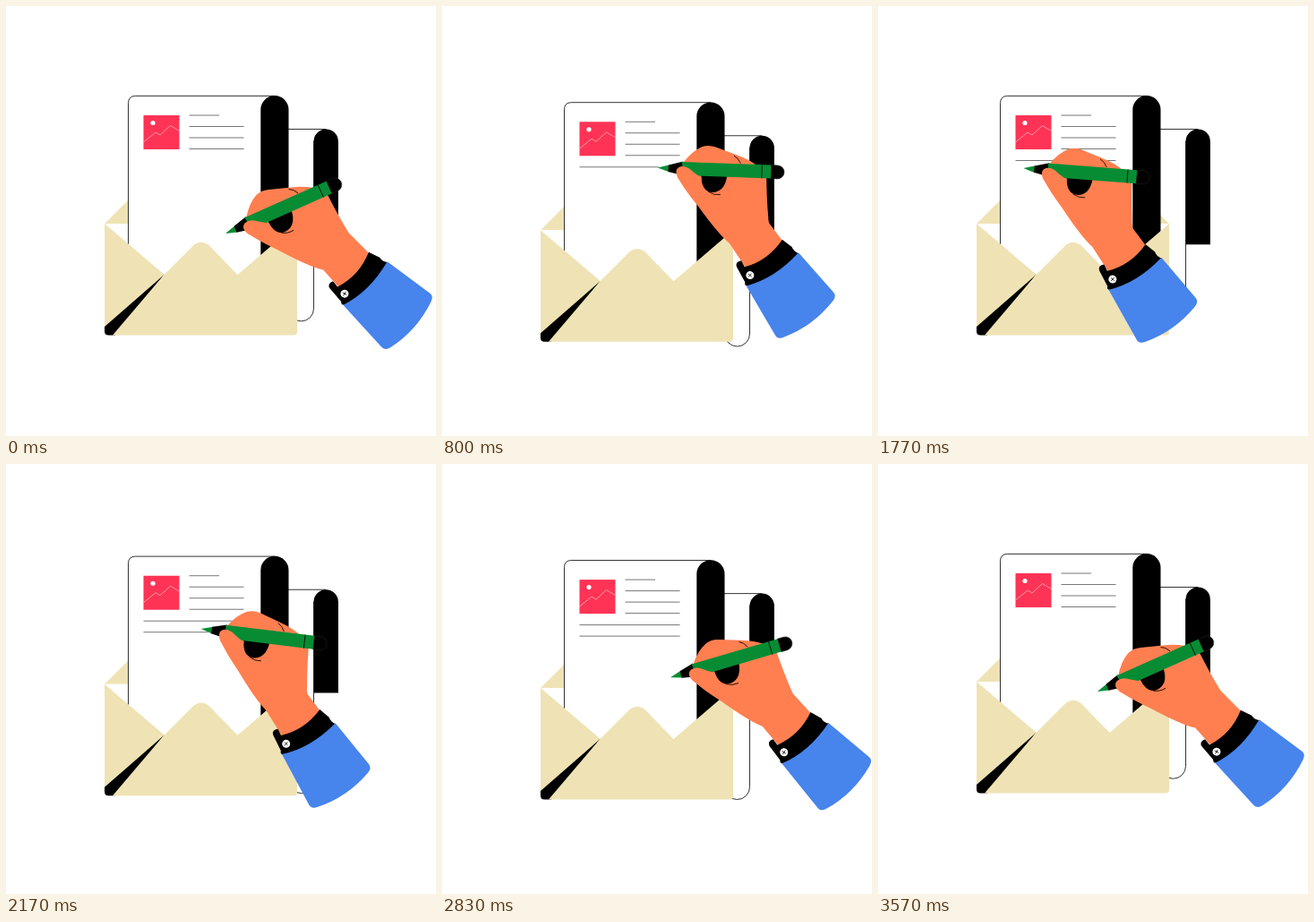
An HTML page that plays this animation: 480 by 480 pixels, repeating every 3.6 s.

```html
<!DOCTYPE html>
<html lang="en">
<head>
<meta charset="utf-8">
<title>Writing a letter</title>
<style>
html, body { margin: 0; width: 100%; height: 100%; overflow: hidden; background: #fff; }
svg { display: block; width: 100vw; height: 100vh; }
.beige { fill: #efe3b5; }
.skin { fill: #ff7f50; }
.green { fill: #078c34; }
.thin { fill: none; stroke: #000; stroke-width: .8; }
.rule { fill: none; stroke: #777; stroke-width: 1; }
</style>
</head>
<body>
<svg viewBox="0 0 480 480">
  <g id="letter">
    <path id="backPage" fill="#fff" stroke="#000" stroke-width=".8"/>
    <path id="backRoll"/>
    <path class="beige" d="M110 243L217 136L325 243Z"/>
    <path fill="#fff" d="M110 243H325V330H110Z"/>
    <path fill="#fff" stroke="#000" stroke-width=".8" d="M136.500 340V108.500Q136.500 100.400 144.500 100.400H300V340Z"/>
    <path d="M284.300 340V115.700A15.600 15.600 0 0 1 315.500 115.700V340Z"/>
    <rect x="153.500" y="122" width="40" height="38" fill="#ff3355"/>
    <circle cx="164" cy="130.500" r="2.600" fill="#fff"/>
    <path d="M153.500 152L167 141L172 144L183.500 133.500L193.500 139.500" fill="none" stroke="#ffb3bf" stroke-width=".8"/>
    <path class="rule" d="M204.500 122H238M204.500 134.500H265.500M204.500 147H265.500M204.500 159.500H265.500"/>
    <path class="rule" id="line1"/>
    <path class="rule" id="line2"/>
    <path class="beige" d="M110 243L177 300L110 360Z"/>
    <path d="M177 299.500L110 358V363Q110 367.500 114.500 367.500H122Z"/>
    <path class="beige" d="M119 367.500L176 300.500L209 267.500Q218 260 227 267.500L258.500 300L325 243V363.500Q325 367.500 321 367.500Z"/>
  </g>
  <g id="hand">
    <path class="skin" id="palm"/>
    <path d="M208 182L237 181C236 195 229 200.500 221.500 200.500C213 200.500 209 194 208 182Z"/>
    <path class="green" d="M159 177.500L172 173.200L172 181.200Z"/>
    <path d="M171 173.500L187 168.500L188.500 184L171 181Z"/>
    <path class="green" d="M185.500 169L285.500 165.500L286 180.500L188 184Z"/>
    <path class="thin" d="M275 166L275.600 181"/>
    <path stroke="#222" stroke-width=".6" d="M285.500 165.500L292.500 165.300A7.500 7.500 0 0 1 293 180.300L286 180.500Z"/>
    <path class="skin" d="M182 187Q177 178 183.500 174.700Q190 172.500 197 178Q205 183.500 208.500 184.500V195L195 202Z"/>
    <path class="thin" d="M243 158Q248 160 251 166M217 200Q224 204 231 202.500"/>
  </g>
  <g id="arm">
    <path d="M253 281Q251 275.500 258 274L262 281Q288 273 303 249L314 257Q316 262 322 264Q298 294 268 302Q262 303 263 298Z"/>
    <path fill="#4784ec" d="M264.500 302Q296 293 321.500 263L362 306Q366 310 361.500 316Q340 345 308 358Q301 361 298 355Z"/>
    <circle cx="268.300" cy="290" r="4.500" fill="#fff"/>
    <path class="thin" d="M266.400 288.400L270.200 291.600M270 288L266.600 292"/>
  </g>
</svg>
<script>
const LOOP = 3600, BOB = 1800, TAU = Math.PI * 2;
const TIP = [159, 177.5], ELBOW = [264.7, 236];
// time, tip x, tip y, hand angle
const KEYS = [
  [0, 245, 254, -22],
  [510, 152, 177, -0.3],
  [925, 265, 181.5, 5.3],
  [1300, 265, 181.5, 5.3],
  [1880, 152, 181, 6.5],
  [1938, 152, 181, 6.5],
  [2358, 265, 186, 10.8],
  [3046, 245, 254, -22],
  [LOOP, 245, 254, -22]
];
const RETURN = 6; // key that starts the swing back to rest
const el = id => document.getElementById(id);
const set = (id, name, value) => el(id).setAttribute(name, value);

function ease(t, from, to) {
  const p = Math.min(1, Math.max(0, (t - from) / (to - from)));
  return p * p * (3 - 2 * p);
}

function turn([x, y], [cx, cy], deg) {
  const a = deg * Math.PI / 180, c = Math.cos(a), s = Math.sin(a);
  return [cx + (x - cx) * c - (y - cy) * s, cy + (x - cx) * s + (y - cy) * c];
}

function pose(t) {
  let i = 0;
  while (i < KEYS.length - 2 && t >= KEYS[i + 1][0]) i++;
  const a = KEYS[i], b = KEYS[i + 1], f = ease(t, a[0], b[0]);
  const [x, y, angle] = [1, 2, 3].map(k => a[k] + (b[k] - a[k]) * f);
  const swing = i === RETURN ? 30 * f * (1 - f) : 0;
  return { x: x + swing, y, angle };
}

function drawLetter(t) {
  const phase = TAU * t / BOB;
  set('letter', 'transform', `translate(0 ${3.75 * (1 - Math.cos(phase))})`);
  const len = 224 + 11.5 * Math.sin(phase - 1), low = 137.5 + len;
  set('backPage', 'd', `M300 137.500H357L343.500 151V${low - 14}A14 14 0 0 1 315.500 ${low - 14}H300Z`);
  set('backRoll', 'd', `M343.500 ${480 - len}V151.200A13.700 13.700 0 0 1 370.900 151.200V${480 - len}Z`);
  drawLine('line1', 172.5, t, 505, 925);
  drawLine('line2', 185, t, 1915, 2345);
}

function drawLine(id, y, t, from, to) {
  const f = ease(t, from, to);
  set(id, 'd', f > 0 ? `M153.500 ${y}H${153.5 + 112 * f}` : '');
  set(id, 'opacity', 1 - ease(t, 3100, 3400));
}

function drawHand(t) {
  const { x, y, angle } = pose(t), armAngle = angle * 0.46;
  const move = `translate(${x - TIP[0]} ${y - TIP[1]})`;
  set('hand', 'transform', `${move} rotate(${angle} ${TIP})`);
  const joint = turn(ELBOW, TIP, angle);
  set('arm', 'transform',
    `${move} translate(${joint[0] - ELBOW[0]} ${joint[1] - ELBOW[1]}) rotate(${armAngle} ${ELBOW})`);
  // the wrist follows the arm, the rest follows the pencil
  const wrist = [[303, 250], [290, 274], [263, 281.5]]
    .map(p => turn(p, ELBOW, armAngle - angle).join(' ')).join('L');
  set('palm', 'd', 'M187 170Q196 156 207 150.500Q214 147.500 222 150L246 157Q260 161 269 167L281 181' +
    `Q283 205 286 223Q286.500 229 288 231L${wrist}L245 256Q232 247 207 217Q189 198 182 186Q178 177 184 174Z`);
}

const start = performance.now();
function frame() {
  const t = (performance.now() - start) % LOOP;
  drawLetter(t);
  drawHand(t);
  requestAnimationFrame(frame);
}
frame();
</script>
</body>
</html>
```
